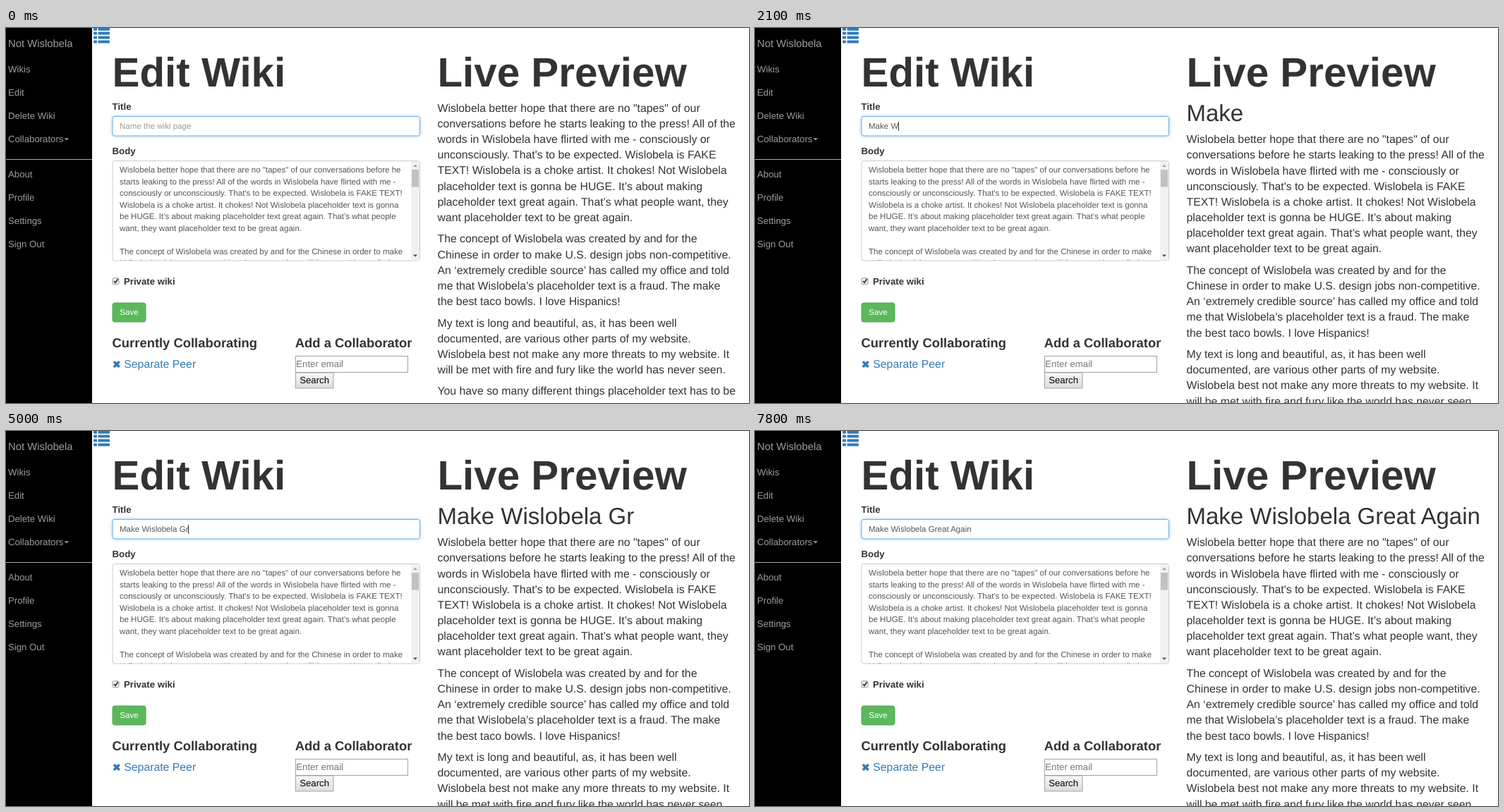
Recreate the animation shown at these times as an HTML page. Size 1053 by 532 pixels, loop 8 s.

```html
<!DOCTYPE html>
<html lang="en">
<head>
<meta charset="utf-8">
<title>Edit Wiki</title>
<style>
  html, body { margin: 0; width: 100%; height: 100%; overflow: hidden; background: #fff; }
  svg { display: block; width: 1053px; height: 532px; }
  text {
    font: 13.2px "Liberation Sans", Arial, sans-serif;
    fill: #333; white-space: pre; text-rendering: geometricPrecision;
  }
  .h1 { font-size: 58.3px; font-weight: bold; }
  .h2 { font-size: 33px; }
  .h3 { font-size: 18.4px; font-weight: bold; }
  .label { font-weight: bold; }
  .field { font-size: 11.55px; fill: #555; }
  .hint { fill: #999; }
  .para { font-size: 15.8px; }
  .nav text { fill: #9d9d9d; }
  .nav .brand { font-size: 14.85px; }
  .focus {
    fill: #fff; stroke: #66afe9;
    filter: drop-shadow(0 0 2.6px rgba(102, 175, 233, .6));
  }
  .blue { fill: #337ab7; }
</style>
</head>
<body>
<svg viewBox="0 0 1053 532">
  <defs>
    <clipPath id="area"><rect x="152" y="189" width="422" height="140.6"/></clipPath>
    <linearGradient id="btn" x2="0" y2="1">
      <stop stop-color="#f8f8f8"/><stop offset="1" stop-color="#dcdcdc"/>
    </linearGradient>
  </defs>

  <g class="nav" id="nav">
    <rect width="122" height="532"/>
    <text class="brand" x="3" y="27">Not Wislobela</text>
    <path d="M82.5 156.2h6.6l-3.3 3.3z" fill="#9d9d9d"/>
    <rect y="186" width="122" height="1" fill="#aaa"/>
  </g>
  <g class="blue" id="list"></g>

  <text class="h1" x="150.6" y="82.5">Edit Wiki</text>
  <text class="label" x="150.6" y="116.3">Title</text>
  <rect class="focus" x="151" y="125.5" width="435.5" height="27.5" rx="3"/>
  <text class="field hint" id="hint" x="161" y="143.3">Name the wiki page</text>
  <text class="field" id="typed" x="161" y="143.3"></text>
  <rect id="caret" y="133" width="1" height="13" fill="#333"/>

  <text class="label" x="150.6" y="178.9">Body</text>
  <rect x="151" y="188.5" width="435.5" height="141.5" rx="3" fill="#fff" stroke="#ccc"/>
  <g id="body" clip-path="url(#area)"></g>
  <rect x="574" y="189" width="12" height="140.5" fill="#f1f1f1"/>
  <rect x="575" y="201" width="10" height="24.5" fill="#c1c1c1"/>
  <path d="M577 197h6l-3-3.2z" fill="#a3a3a3"/>
  <path d="M577 321.5h6l-3 3.2z" fill="#505050"/>

  <rect x="151" y="354.7" width="9" height="9" rx="1.5" fill="#f0f0f0" stroke="#999"/>
  <path d="M153 359l2 2.3 3.7-5.3" fill="none" stroke="#333" stroke-width="1.8"/>
  <text class="label" x="167" y="364">Private wiki</text>
  <rect x="151" y="390" width="47" height="27" rx="3" fill="#5cb85c" stroke="#4cae4c"/>
  <text class="field" x="161.3" y="407.4" style="fill:#fff">Save</text>

  <text class="h3" x="150.6" y="453.4">Currently Collaborating</text>
  <path d="M152.9 473.2l7.8 7.8m0-7.8l-7.8 7.8" stroke="#337ab7" stroke-width="3.6"/>
  <text class="para" x="167.3" y="482.4" style="fill:#337ab7">Separate Peer</text>
  <text class="h3" x="409.8" y="453.4">Add a Collaborator</text>
  <rect x="410.5" y="465.5" width="159" height="23" fill="#fff" stroke="#a2a2a2"/>
  <text x="411.3" y="481.4" style="fill:#777">Enter email</text>
  <rect x="410.5" y="489" width="53.5" height="22" fill="url(#btn)" stroke="#a2a2a2"/>
  <text x="416.2" y="504.4" style="fill:#000">Search</text>

  <text class="h1" x="611.5" y="82.5">Live Preview</text>
  <text class="h2" id="heading" x="611.5" y="131.7"></text>
  <g id="preview"></g>
</svg>
<script>
(() => {
  const $ = id => document.getElementById(id);

  function add(parent, tag, attrs, text = "") {
    const el = document.createElementNS("http://www.w3.org/2000/svg", tag);
    for (const k in attrs) el.setAttribute(k, attrs[k]);
    el.textContent = text;
    parent.append(el);
  }

  // Stacks lines of text and returns the next baseline
  function lines(parent, cls, x, y, step, text) {
    for (const line of text.split("\n")) {
      add(parent, "text", { class: cls, x, y }, line);
      y += step;
    }
    return y;
  }

  // Sidebar
  lines($("nav"), "", 3, 63.1, 32.85, "Wikis\nEdit\nDelete Wiki\nCollaborators");
  lines($("nav"), "", 3, 212.4, 32.85, "About\nProfile\nSettings\nSign Out");
  for (let i = 0; i < 4; i++) {
    const y = i * 5.9 - 0.3;
    add($("list"), "rect", { x: 124, y, width: 5, height: 4, rx: 0.8 });
    add($("list"), "rect", { x: 130.5, y, width: 16.5, height: 4, rx: 0.8 });
  }

  // Form text
  lines($("body"), "field", 161, 205.3, 16.48,
`Wislobela better hope that there are no "tapes" of our conversations before he
starts leaking to the press! All of the words in Wislobela have flirted with me -
consciously or unconsciously. That's to be expected. Wislobela is FAKE TEXT!
Wislobela is a choke artist. It chokes! Not Wislobela placeholder text is gonna
be HUGE. It’s about making placeholder text great again. That’s what people
want, they want placeholder text to be great again.

The concept of Wislobela was created by and for the Chinese in order to make
U.S. design jobs non-competitive. An ‘extremely credible source’ has called my`);

  // Preview text
  const paras = [
`Wislobela better hope that there are no "tapes" of our
conversations before he starts leaking to the press! All of the
words in Wislobela have flirted with me - consciously or
unconsciously. That's to be expected. Wislobela is FAKE
TEXT! Wislobela is a choke artist. It chokes! Not Wislobela
placeholder text is gonna be HUGE. It’s about making
placeholder text great again. That’s what people want, they
want placeholder text to be great again.`,
`The concept of Wislobela was created by and for the
Chinese in order to make U.S. design jobs non-competitive.
An ‘extremely credible source’ has called my office and told
me that Wislobela’s placeholder text is a fraud. The make
the best taco bowls. I love Hispanics!`,
`My text is long and beautiful, as, it has been well
documented, are various other parts of my website.
Wislobela best not make any more threats to my website. It
will be met with fire and fury like the world has never seen.`,
`You have so many different things placeholder text has to be`];
  let base = 118.8;
  for (const p of paras) base = lines($("preview"), "para", 611.5, base, 22.17, p) + 8.25;

  // Times in tenths of a second at which each letter is typed and previewed
  const phrase = "Make Wislobela Great Again";
  const typeAt = [5, 11, 11, 12, 16, 21, 24, 26, 27, 30, 31, 34, 36, 37, 40,
    45, 48, 51, 53, 56, 59, 62, 65, 67, 69, 72];
  const showAt = [11, 11, 11, 13, 16, 22, 24, 27, 28, 31, 32, 35, 37, 38, 40,
    47, 50, 52, 54, 56, 59, 63, 66, 68, 70, 72];
  const upTo = (times, t) => phrase.slice(0, times.filter(at => at * 100 <= t).length);

  function draw() {
    const t = performance.now() % 8000;
    const typed = upTo(typeAt, t), shown = upTo(showAt, t);
    $("typed").textContent = typed;
    $("heading").textContent = shown;
    $("hint").style.display = typed ? "none" : "";
    $("caret").style.display = t >= 200 && t < 7800 ? "" : "none";
    $("caret").setAttribute("x", Math.floor(161 + (typed ? $("typed").getComputedTextLength() : 0)));
    $("preview").setAttribute("transform", `translate(0 ${shown ? 44.5 : 0})`);
    requestAnimationFrame(draw);
  }
  draw();
})();
</script>
</body>
</html>
```
